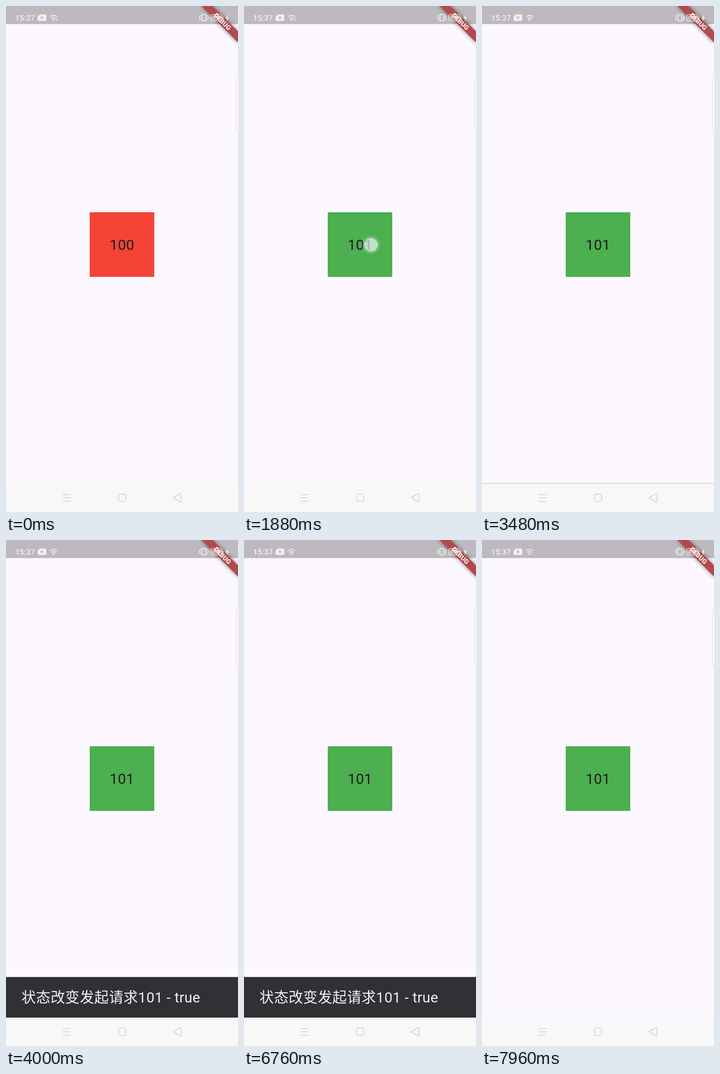
Animation of 507 by 1104 pixels, one loop 8 s. Source, as an HTML page:

```html
<!DOCTYPE html>
<html lang="zh-CN">
<head>
<meta charset="utf-8">
<title>Tap counter</title>
<style>
  html, body { margin: 0; width: 100%; height: 100%; overflow: hidden; background: #fdf7ff; }
  svg { display: block; }
  text { font-family: Roboto, "Noto Sans CJK SC", "Noto Sans CJK", sans-serif; }
  .body { font-size: 31.5px; letter-spacing: .35px; }
</style>
</head>
<body>
<svg width="507" height="1104" viewBox="0 0 507 1104">
  <defs>
    <filter id="blur" x="-30%" y="-150%" width="160%" height="400%"><feGaussianBlur stdDeviation="5"/></filter>
    <radialGradient id="touch">
      <stop offset="0" stop-color="#fff" stop-opacity=".64"/>
      <stop offset=".68" stop-color="#fff" stop-opacity=".64"/>
      <stop offset=".74" stop-color="#8fb0b0" stop-opacity=".55"/>
      <stop offset=".82" stop-color="#c0d0d8" stop-opacity=".3"/>
      <stop offset="1" stop-color="#fff" stop-opacity="0"/>
    </radialGradient>
  </defs>

  <rect width="507" height="1104" fill="#fdf7ff"/>
  <rect id="square" x="183" y="450" width="141" height="141"/>
  <text id="count" class="body" x="226.4" y="532" fill="#1d1b20"></text>

  <g id="snackbar">
    <rect y="953.5" width="507" height="90" fill="#313035"/>
    <text class="body" x="33.8" y="1008.5" fill="#f5eff7">状态改变发起请求101 - true</text>
  </g>

  <rect width="507" height="39.5" fill="#bdb9be"/>
  <g transform="translate(507) rotate(45)">
    <rect x="-57" y="39.4" width="114" height="16.9" filter="url(#blur)" opacity=".5"/>
    <rect x="-57" y="39.4" width="114" height="16.9" fill="#b14a4c"/>
    <text y="52.9" text-anchor="middle" font-size="14.36" font-weight="900" fill="#f6eeee">DEBUG</text>
  </g>

  <!-- status bar -->
  <g fill="#fff" opacity=".8">
    <text x="20" y="32" font-size="17" font-weight="500">15:37</text>
    <path d="M74 18.5h11q3 0 3 3v8q0 3-3 3h-13q-3 0-3-3v-6z"/>
    <path d="M76 23l5 5m0-5l-5 5" stroke="#aaa6ab" stroke-width="1.6"/>
    <g fill="none" stroke="#fff" stroke-width="2">
      <path d="M96 23.5q8-6.5 16 0M99 27.3q5-4 10 0"/>
      <rect x="428" y="18.5" width="9" height="14" rx="2"/>
      <path d="M425.5 20q-5 5.500 0 11M439.500 20q5 5.500 0 11" stroke-width="1.6"/>
      <rect x="447.500" y="18.500" width="24" height="14" rx="4" stroke-width="1.6"/>
      <path d="M474 23v5" stroke-width="1.8"/>
    </g>
    <path d="M101 29.500q3-2 6 0l-3 3.500z"/>
    <path id="traffic" d="M111 27l2 2.500h-4zM111 33.500l2-2.500h-4z"/>
    <rect x="450" y="21" width="19" height="9" rx="2" opacity=".6"/>
    <path d="M485 19l-5.500 8h3.500l-1 6 5.500-8h-3.500z"/>
  </g>
  <rect x="503.500" y="149.500" width="12" height="126" rx="4" fill="#fff" fill-opacity=".6" stroke="#ddcfe8"/>

  <!-- navigation bar -->
  <rect y="1042" width="507" height="62" fill="#f8f8f8"/>
  <g fill="none" stroke="#cfcfcf" stroke-width="1.5" stroke-linejoin="round">
    <path d="M123.500 1066h17.500m0 7h-17.500m0 7.500h17.500"/>
    <rect x="246" y="1065" width="15.500" height="16" rx="3.500"/>
    <path d="M366.500 1072l14-8q2-1 2 1v16q0 2-2 1l-14-8q-1.500-1 0-2z"/>
  </g>

  <circle id="spot" r="21" fill="url(#touch)"/>
</svg>
<script>
const LOOP = 8000, SNACK_HEIGHT = 88.5;
const TAPS = 7, FIRST_TAP = 1000, TAP_GAP = 262.5, PRESS = 104, FADE = 200;
const el = id => document.getElementById(id);
const [square, count, snackbar, traffic, spot] =
  ['square', 'count', 'snackbar', 'traffic', 'spot'].map(el);
const clamp = v => Math.min(1, Math.max(0, v));

// cubic-bezier(.4, 0, .2, 1)
function ease(x) {
  let lo = 0, hi = 1, u;
  for (let i = 0; i < 20; i++) {
    u = (lo + hi) / 2;
    const bx = 1.2 * u * (1 - u) ** 2 + .6 * u * u * (1 - u) + u ** 3;
    if (bx < x) lo = u; else hi = u;
  }
  return u * u * (3 - 2 * u);
}

function draw(t) {
  const releases = Math.floor((t - FIRST_TAP - PRESS) / TAP_GAP) + 1;
  const on = Math.min(TAPS, Math.max(0, releases)) % 2 === 1;
  square.setAttribute('fill', on ? '#4caf50' : '#f44336');
  count.textContent = on ? 101 : 100;

  const tap = Math.min(TAPS - 1, Math.floor((t - FIRST_TAP) / TAP_GAP));
  const held = t - FIRST_TAP - tap * TAP_GAP;
  const drift = Math.max(0, tap - 3) / 3;
  spot.setAttribute('cx', 277.5 - 5 * drift);
  spot.setAttribute('cy', 521 - 8 * drift);
  spot.setAttribute('opacity', tap < 0 ? 0 : 1 - clamp((held - PRESS) / FADE));

  const shown = t < 5000 ? clamp((t - 3470) / 280) : clamp((7955 - t) / 250);
  snackbar.setAttribute('visibility', shown > 0 ? 'visible' : 'hidden');
  snackbar.setAttribute('transform', `translate(0 ${SNACK_HEIGHT * (1 - ease(shown))})`);

  const busy = t < 2680 || (t >= 5000 && t < 6000);
  traffic.setAttribute('visibility', busy ? 'visible' : 'hidden');
}

function tick() {
  draw(performance.now() % LOOP);
  requestAnimationFrame(tick);
}
tick();
</script>
</body>
</html>
```
